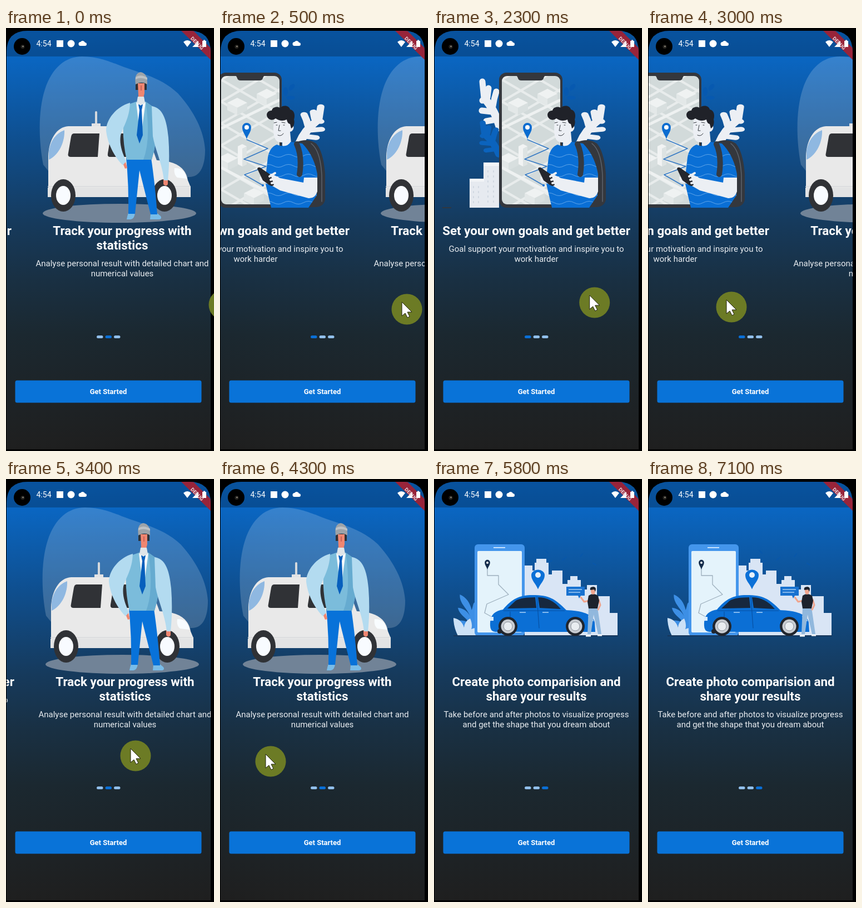
An HTML page for the animation above (7200 ms loop, 374 px wide and 758 px high).

```html
<!DOCTYPE html>
<html lang="en">
<head>
<meta charset="utf-8">
<style>
  html, body { margin: 0; width: 100%; height: 100%; overflow: hidden; background: #000; }
  svg { display: block; width: 374px; height: 758px; font-family: Roboto, sans-serif; }
  .title { font-size: 22.4px; font-weight: 700; fill: #fff; text-anchor: middle; }
  .sub { font-size: 15px; fill: #e9edf1; text-anchor: middle; }
  .line { fill: none; stroke-linecap: round; stroke-linejoin: round; }
</style>
</head>
<body>
<svg viewBox="0 0 374 758">
  <defs>
    <linearGradient id="sky" gradientUnits="userSpaceOnUse" x1="0" y1="5" x2="0" y2="755">
      <stop offset="0" stop-color="#0a6cd0"/>
      <stop offset=".063" stop-color="#0a66c2"/>
      <stop offset=".26" stop-color="#0f4f8f"/>
      <stop offset=".46" stop-color="#163a5c"/>
      <stop offset=".593" stop-color="#193043"/>
      <stop offset=".727" stop-color="#1b2830"/>
      <stop offset="1" stop-color="#1f1f1f"/>
    </linearGradient>
    <clipPath id="screen"><path d="M1 755V43Q1 5 39 5H330Q368 5 368 43V755Z"/></clipPath>
    <clipPath id="map"><rect x="122" y="86" width="105" height="230" rx="9"/></clipPath>
    <clipPath id="shirt"><path id="shirtShape" d="M222 209Q209 214 206 232L201 275 212 322H279L294 300 295 262Q289 228 268 207L247 204Q240 216 222 209Z"/></clipPath>
    <pattern id="blocks" width="48" height="48" patternUnits="userSpaceOnUse" patternTransform="translate(122 90) scale(1 .58) rotate(45)">
      <rect width="48" height="48" fill="#d2dada"/>
      <path d="M0 3H48M3 0V48" stroke="#e8ecec" stroke-width="6"/>
    </pattern>
    <g id="cube">
      <path fill="#eff2f2" d="M0-9 18 0 0 9-18 0Z"/>
      <path fill="#e3e8e8" d="M-18 0 0 9V22L-18 13Z"/>
      <path fill="#d8dfdf" d="M18 0 0 9V22L18 13Z"/>
    </g>
    <g id="leaf" class="line" stroke-width="11">
      <path d="M0 0Q-10-28-28-52L-31-82M-27-52-31-48M-12-38Q-10-52-6-64M-22-54-20-70M-14-28-32-30M-7-14-24-11"/>
      <path d="M0 0Q-8-30-24-48" stroke-width="14"/>
    </g>
    <path id="pin" d="M0 17C-3 8-8 4-8-4A8 8 0 0 1 8-4C8 4 3 8 0 17Z"/>
    <path id="bush" d="M34 90C26 78 8 72 3 57 13 55 22 60 27 67 20 52 4 46 1 29 13 30 21 38 25 48 20 31 3 19 5 0 17 6 25 18 28 34 32 21 30 20 35 16 40 27 38 40 34 50 40 65 38 78 34 90Z"/>
    <g id="tyre"><ellipse rx="22" ry="29" fill="#303236"/><ellipse rx="13" ry="17" fill="#f8fbff"/></g>
    <g id="rim"><circle r="17" fill="#20252d"/><circle r="12.500" fill="#c8ccd2"/><circle r="8" fill="#e9edf1" stroke="#8e959d"/></g>
  </defs>

  <g clip-path="url(#screen)">
    <rect width="374" height="758" fill="url(#sky)"/>

    <g id="pages">
      <!-- Goals -->
      <g>
        <path d="M15 322H31" stroke="#303740" stroke-width="2"/>
        <use href="#leaf" x="118" y="178" stroke="#eceff4"/>
        <use href="#leaf" transform="translate(117 227) scale(.95 .7)" stroke="#0b63bd"/>
        <use href="#leaf" transform="translate(264 205) scale(-1.2 .78)" stroke="#eceff4"/>
        <g fill="#0759b0"><ellipse cx="249" cy="106" rx="7" ry="4" transform="rotate(-50 249 106)"/><ellipse cx="238" cy="114" rx="4" ry="8"/><ellipse cx="247" cy="125" rx="8" ry="3.500"/></g>
        <path fill="#e6eaf0" d="M89 245H117V322H64V274H89Z"/>
        <path fill="#f5f6f8" d="M89 241H117V247H89ZM64 270H90V275H64Z"/>
        <path class="line" stroke="#d0d8e2" stroke-width="2" stroke-dasharray="2 7" d="M71 284V318M80 284V318M97 256V318M107 256V318"/>
        <rect x="117" y="80" width="114" height="242" rx="13" fill="#34373d"/>
        <g clip-path="url(#map)">
          <rect x="122" y="86" width="105" height="230" fill="url(#blocks)"/>
          <use href="#cube" x="151" y="134"/><use href="#cube" x="204" y="118"/>
          <use href="#cube" x="134" y="233"/><use href="#cube" x="181" y="296"/>
          <path d="M122 180 227 129M122 250 227 305" stroke="#eef1f1" stroke-width="5"/>
          <path fill="#f1f3f3" d="M152 212 160 208 168 212V244L160 248 152 244Z"/>
          <path fill="#dde3e3" d="M160 216 168 212V244L160 248Z"/>
        </g>
        <path fill="#34373d" d="M146 84H202Q198 86 197 90 196 94 191 94H157Q152 94 151 90 150 86 146 84Z"/>
        <path class="line" stroke="#3479c4" stroke-width="1.600" d="M168 200 206 216 163 235 203 248 164 263 197 282"/>
        <circle cx="197" cy="282" r="2" fill="#0a6cd0"/>
        <use href="#pin" x="168" y="182" fill="#0a6cd0"/><circle cx="168" cy="178" r="4" fill="#fff"/>
        <path fill="#34373d" d="M256 205Q278 196 293 207 306 222 309 262V308Q306 321 290 321H270Z"/>
        <path class="line" stroke="#5d646d" stroke-width="1.500" d="M284 207Q301 220 303 265V311"/>
        <path fill="#eceff4" d="M218 160Q214 184 218 196 221 206 232 205V211Q240 217 248 207L246 186Q254 184 252 174L246 158Z"/>
        <path fill="#202229" d="M208 163C201 157 204 148 213 148 214 141 224 140 228 143 234 137 245 139 246 146 255 148 255 158 253 164 255 171 252 178 248 180L246 172Q241 171 240 164 230 169 220 162 214 167 208 163Z"/>
        <path class="line" stroke="#33383e" d="M221 174h2M234 174h2M217 170l5-1M231 169l6 1M227 174l-2 10h4M224 192q6 3 10-3"/>
        <use href="#shirtShape" fill="#0a6fd5"/>
        <g clip-path="url(#shirt)">
          <path id="wave" class="line" stroke="#69abea" stroke-width=".9" d="M198 229q9-5 18 0t18 0 18 0 18 0 18 0 18 0"/>
          <use href="#wave" y="18"/><use href="#wave" y="35"/><use href="#wave" y="52"/><use href="#wave" y="69"/><use href="#wave" y="84"/>
        </g>
        <path class="line" stroke="#343b44" stroke-width="10" d="M258 208Q268 230 263 262"/>
        <path fill="#eceff4" d="M271 268H295V293Q291 306 279 305L228 291 209 280 192 276 191 267 212 261 228 269 270 277Z"/>
        <path fill="#25272d" d="M187 252Q188 249 192 250L211 263 217 281Q214 285 208 281L197 273Z"/>
        <path class="line" stroke="#eceff4" stroke-width="4" d="M209 266 219 260M211 272 223 268M213 278 225 276"/>
        <text class="title" x="184" y="371">Set your own goals and get better</text>
        <text class="sub" x="184" y="401">Goal support your motivation and inspire you to</text>
        <text class="sub" x="184" y="419">work harder</text>
      </g>

      <!-- Statistics -->
      <g transform="translate(368)">
        <path fill="#fff" fill-opacity=".18" d="M42 245C34 205 32 150 45 110 58 70 83 51 112 51 142 52 154 58 172 64 206 79 250 85 284 117 314 150 331 185 333 218 333 240 328 267 304 267H60Z"/>
        <ellipse cx="179" cy="332" rx="138" ry="17" fill="#718397"/>
        <path d="M137 151V176" stroke="#d5d9dd" stroke-width="4" stroke-linecap="round"/><path fill="#e2e3e5" d="M129 176V171H145V176Z"/>
        <path fill="#e9e9e9" d="M51 290V230C52 200 66 177 87 176H202C225 178 235 207 246 237 277 238 298 248 302 273L307 285V303H50Z"/>
        <path fill="#8fb8e1" d="M52 233V220Q57 192 80 183C81 203 71 227 52 236Z"/>
        <path fill="#303236" d="M97 189H143L140 231H91Q85 231 87 224L92 195Q93 189 97 189ZM164 189H196Q213 199 219 231H162Q157 231 158 225Z"/>
        <path d="M50 284H307" stroke="#d9dadc" stroke-width="1.500"/>
        <path fill="#f8fcff" d="M278 251Q296 250 300 270L283 268Q276 262 278 251Z"/>
        <path fill="#e2e3e4" d="M50 286H307V299Q307 303 302 303H50Z"/>
        <use href="#tyre" x="78" y="300"/><use href="#tyre" x="260" y="300"/>
        <path fill="#79bce8" d="M195 331H207Q206 342 199 343H192Q193 337 195 331ZM235 332H247L253 337Q256 342 250 343H234Z"/>
        <path fill="#0872d9" d="M191 233H236Q243 280 247 334H235L215 255 207 333H195Q196 280 191 233Z"/>
        <path fill="#7bbcdb" d="M189 139 209 132H226L242 143Q251 190 237 236H192Q181 190 189 139Z"/>
        <path fill="#66abd0" d="M226 132 242 143Q251 190 237 236H222Q236 200 226 132Z"/>
        <path fill="#f7fafc" d="M209 133 217 139 226 133 219 184 215 184Z"/>
        <path fill="#075fbd" d="M213 137H221L219 147 221 192 215 207 210 192 215 147Z"/>
        <path fill="#ef8671" d="M184 240 190 240 193 251 189 252ZM258 271H266V280Q263 285 258 280Z"/>
        <path fill="#b3dbf0" d="M198 134C173 141 155 164 155 184 158 211 173 234 185 246L191 239C183 221 179 208 181 193 185 177 197 163 198 134ZM237 140C257 143 264 164 267 196Q270 235 266 273H259C255 239 244 221 239 194Z"/>
        <path fill="#303236" d="M208 98H228V111H208Z"/>
        <path fill="#ef8671" d="M212 99H224V117L222 125V134H213V121Z"/>
        <path fill="#dfe5e9" d="M212 123H223L225 134 217 139 210 134Z"/>
        <path d="M218 103v9" stroke="#ca6258" stroke-width="2"/>
        <path fill="#9ca3a9" d="M208 101Q205 81 217 79 230 81 229 101 219 94 208 101Z"/>
        <path fill="#bcc1c5" d="M208 88Q217 82 229 89V93Q218 87 208 92Z"/>
        <text class="title" x="184" y="371">Track your progress with</text>
        <text class="title" x="184" y="397">statistics</text>
        <text class="sub" x="184" y="427">Analyse personal result with detailed chart and</text>
        <text class="sub" x="184" y="445">numerical values</text>
      </g>

      <!-- Photos -->
      <g transform="translate(736)">
        <path class="line" stroke="#0857aa" stroke-width="2" d="M200 128l5 5M231 145l7-5M286 151l5 3M263 139l4-5M207 149l5-3"/>
        <path fill="#d9e5f5" d="M163 281V155H177V164H181V150H184V143H202V150H206V171H212V164H231V188H240V181H245V174H258V181H264V198H275V190H293V210H316V240H330V281Z"/>
        <use href="#bush" transform="translate(42 207) scale(.92 .82)" fill="#3d8fe5"/>
        <path fill="#cce1f6" d="M43 281Q35 265 35 249 50 252 54 266 55 255 65 250 70 261 67 269 77 264 83 271L76 281Z"/>
        <rect x="73" y="117" width="90" height="164" rx="6" fill="#4496ec"/>
        <rect x="78" y="129" width="80" height="146" rx="2" fill="#e4f3fb"/>
        <path d="M107 123H128" stroke="#c5e1fc" stroke-width="2"/>
        <path class="line" stroke="#9dafbd" stroke-width="1.300" d="M96 161V173H116V189L134 207 95 224 91 240 102 246"/>
        <use href="#pin" transform="translate(96 152) scale(.6)" fill="#142c4b"/><circle cx="96" cy="150" r="2" fill="#fff"/>
        <use href="#pin" transform="translate(187 177) scale(1.5 1.2)" fill="#0b70d7"/><circle cx="187" cy="172" r="5" fill="#e6f0fa"/>
        <path fill="#1872d0" d="M238 193H271V209H264L261 214 259 209H238Z"/>
        <path d="M242 198H266M242 203H263" stroke="#a8cef4" stroke-width="1.300"/>
        <path d="M35 281H331" stroke="#17365a" stroke-width="2"/>
        <path fill="#0b6fd5" d="M101 263C100 244 108 237 124 234 140 215 153 208 177 208 207 208 217 214 238 235 266 236 286 242 289 257L290 274H110Q101 273 101 263Z"/>
        <path fill="#17283e" d="M132 232 147 218Q157 212 182 212L184 231ZM187 212Q211 212 228 233L190 231Z"/>
        <path class="line" stroke="#0751a4" stroke-width="1.200" d="M125 236 235 236M185 211 189 267M137 238V256"/>
        <path d="M154 239h11M195 239h11" stroke="#a9d1f8" stroke-width="1.500"/>
        <path fill="#d8ecff" d="M277 245Q286 247 287 255L279 252ZM101 247h6v7h-6Z"/>
        <use href="#rim" x="133" y="264"/><use href="#rim" x="254" y="264"/>
        <circle cx="118" cy="273" r="4" fill="#20252d"/>
        <path fill="#91b8dd" d="M278 230H294L301 278H295L287 243 282 278H276Z"/>
        <path d="M273 281h9M294 280h8" stroke="#f5f7f9" stroke-width="3"/>
        <path class="line" stroke="#f0a58e" stroke-width="3" d="M279 218 270 220 264 212M296 216 299 226 295 234"/>
        <path fill="#1d222c" d="M278 209Q286 203 295 209L297 218 294 232H278L276 220Z"/>
        <ellipse cx="286" cy="201" rx="4" ry="6" fill="#f0a58e"/>
        <path fill="#1d222c" d="M281 199Q279 193 287 193 293 194 290 202L288 198Z"/>
        <text class="title" x="184" y="371">Create photo comparision and</text>
        <text class="title" x="184" y="397">share your results</text>
        <text class="sub" x="184" y="427">Take before and after photos to visualize progress</text>
        <text class="sub" x="184" y="445">and get the shape that you dream about</text>
      </g>
    </g>

    <g id="dots">
      <rect x="163" y="551" width="11.500" height="5" rx="2.500"/>
      <rect x="178.500" y="551" width="11.500" height="5" rx="2.500"/>
      <rect x="194" y="551" width="11.500" height="5" rx="2.500"/>
    </g>
    <rect x="16.500" y="631.500" width="335" height="40" rx="3.500" fill="#0973d8"/>
    <text x="184" y="656" font-size="13" font-weight="700" fill="#fff" text-anchor="middle">Get Started</text>

    <!-- Status bar -->
    <rect y="5" width="374" height="46" fill="#000" opacity=".24"/>
    <path fill="#98243a" d="M315 5H337L368 36V57Z"/>
    <circle cx="29" cy="33" r="15" fill="#000"/>
    <circle cx="30" cy="33.500" r="3.500" fill="#25231f"/><circle cx="30.500" cy="33" r="1.300" fill="#928b7e"/>
    <g fill="#fff">
      <text x="54.500" y="33" font-size="14">4:54</text>
      <rect x="91" y="22" width="12" height="12"/>
      <circle cx="117" cy="28" r="6.500"/>
      <path d="M134 32A3.500 3.500 0 0 1 134 25 4.500 4.500 0 0 1 142 26 3 3 0 0 1 142 32Z"/>
      <path d="M319 25Q326 19 333 25L326 34ZM335 34 346 23V34ZM353 23H355V21.500H358V23H360V34H353Z"/>
    </g>
    <text transform="translate(344 27) rotate(45)" y="3.500" font-size="9" font-weight="700" fill="#eedce1" text-anchor="middle">DEBUG</text>
  </g>

  <g id="pointer">
    <circle r="27.500" fill="#6c7b25"/>
    <path fill="#fff" stroke="#20220e" d="M-9-13V12L-3 7 1 15 5 13 1 5H9Z"/>
  </g>
</svg>
<script>
  const LOOP = 7200, STEP = 100, PAGE = 368;
  // Each key: time, then values
  const scrollKeys = [
    [0, 343], [100, 325], [300, 222], [500, 120], [600, 55], [700, 14], [800, 0],
    [2700, 0], [2900, 80], [3100, 190], [3200, 262], [3300, 310], [3400, 338], [3600, 360], [3800, 368],
    [4500, 368], [4700, 470], [4800, 535], [4900, 592], [5000, 637], [5200, 702], [5400, 730], [5600, 736]
  ];
  const pointerKeys = [
    [0, 392, 496], [200, 398, 498], [500, 336, 504], [800, 288, 515], [1200, 288, 496], [1600, 288, 492],
    [2600, 289, 492], [3000, 150, 500], [3200, 170, 500], [3400, 233, 496], [3700, 275, 476], [4200, 91, 506],
    [5100, 91, 506], [5400, -40, 512]
  ];
  const pages = document.getElementById('pages');
  const dots = [...document.getElementById('dots').children];
  const pointer = document.getElementById('pointer');

  function sample(keys, t) {
    const next = keys.findIndex(key => key[0] > t);
    if (next < 0) return keys.at(-1).slice(1);
    const a = keys[next - 1], b = keys[next];
    const k = (t - a[0]) / (b[0] - a[0]);
    return a.slice(1).map((v, i) => v + (b[i + 1] - v) * k);
  }

  function draw(now) {
    const t = Math.floor(now % LOOP / STEP) * STEP;
    const [scroll] = sample(scrollKeys, t);
    const active = Math.round(scroll / PAGE);
    pages.setAttribute('transform', `translate(${-scroll})`);
    dots.forEach((dot, i) => dot.setAttribute('fill', i === active ? '#0a6fd6' : '#91bfeb'));
    pointer.setAttribute('transform', `translate(${sample(pointerKeys, t)})`);
  }

  const start = performance.now();
  function tick() {
    draw(performance.now() - start);
    requestAnimationFrame(tick);
  }
  tick();
</script>
</body>
</html>
```
